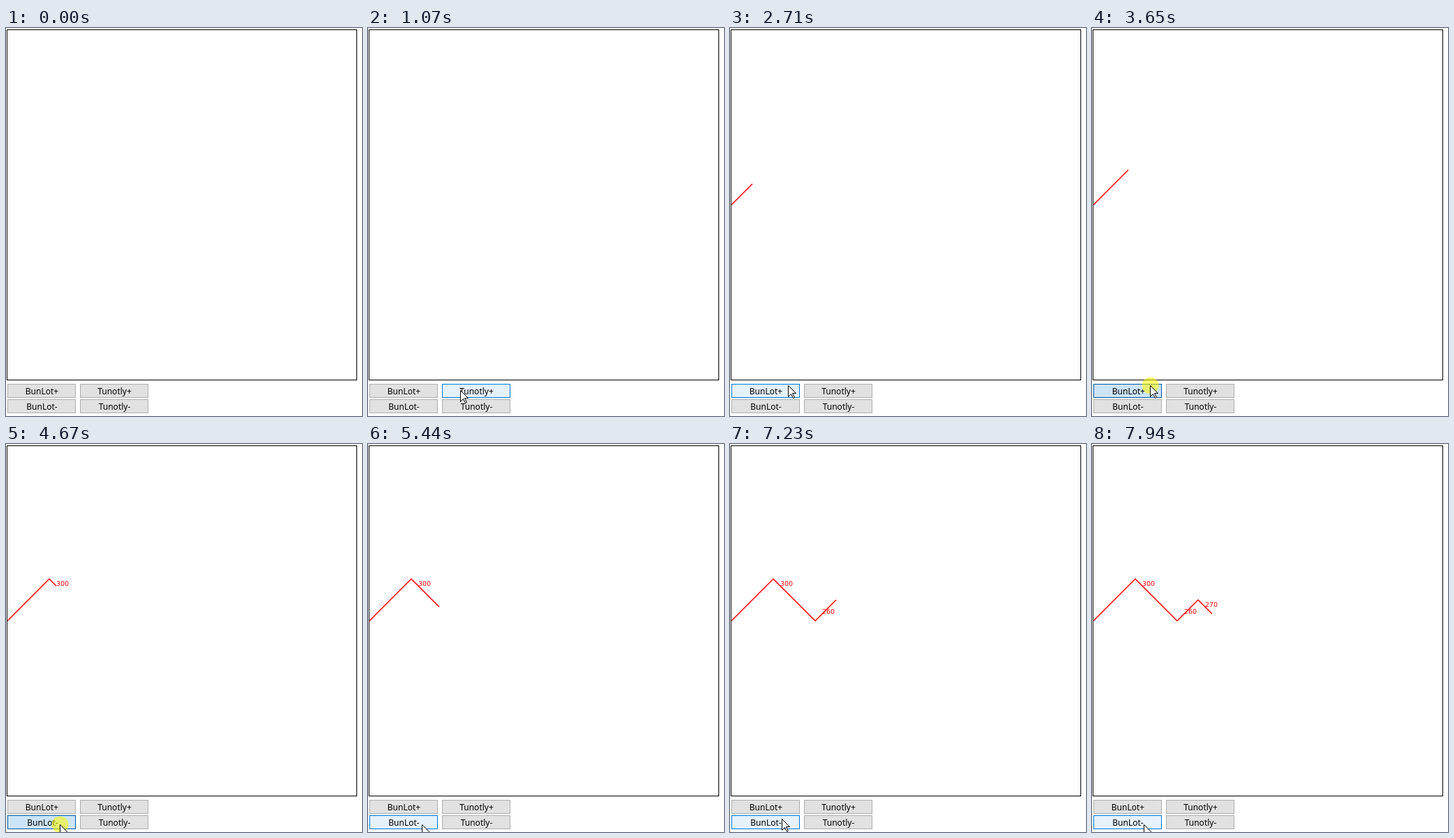
Recreate the animation shown at these times as an HTML page with a canvas. Size 510 by 555 pixels, loop 8 s.

```html
<!DOCTYPE html>
<html lang="en">
<head>
<meta charset="utf-8">
<title>Price chart</title>
<style>
  html, body { margin: 0; width: 100%; height: 100%; overflow: hidden; background: #fff; }
  canvas { display: block; }
</style>
</head>
<body>
<canvas id="stage" width="510" height="555"></canvas>
<script>
const ctx = document.getElementById('stage').getContext('2d');
const LOOP = 8000;
const ORIGIN = { x: 2, y: 503 };   // bottom left of the plot
const START = 250, STEP = 10;
const HOLD = 75;                   // how long a click lasts
const TICK = 75;                   // pointer refresh while it travels
const W = 98, H = 20;

const buttons = ['BunLot', 'Tunotly'].flatMap((name, col) =>
  ['+', '-'].map((sign, row) => ({
    label: name + sign, x: 2 + col * 104, y: 509 + row * 22
  })));

const skins = {
  idle: ['#e1e1e1', '#adadad'],
  hover: ['#e5f1fb', '#0078d7'],
  down: ['#cce4f7', '#005499']
};

// The pointer travels to a spot, then clicks there several times.
const entry = { at: 550, x: 339, y: 548 };
const bursts = [
  { x: 83, y: 511, travel: 750, first: 1765, last: 3650, count: 6, ease: 0.87, dir: 1 },
  { x: 77, y: 544, travel: 150, first: 4280, last: 5990, count: 6, ease: 0.94, dir: -1 },
  { x: 74, y: 517, travel: 300, first: 6465, last: 7070, count: 3, ease: 1, dir: 1 },
  { x: 74, y: 544, travel: 150, first: 7530, last: 7850, count: 2, ease: 1, dir: -1 }
];

const clicks = bursts.flatMap(b => Array.from({ length: b.count }, (_, i) => {
  const press = b.first + (b.last - b.first) * (i / (b.count - 1)) ** b.ease;
  return { press, release: press + HOLD, dir: b.dir };
}));

function pointerAt(t) {
  if (t < entry.at) return null;
  let { at, x, y } = entry;
  for (const b of bursts) {
    if (t < at) break;
    const gone = Math.floor((t - at) / TICK) * TICK;
    const e = Math.sin(Math.min(1, gone / b.travel) * Math.PI / 2);
    x = Math.round(x + (b.x - x) * e);
    y = Math.round(y + (b.y - y) * e);
    at = b.last + HOLD;
  }
  return { x, y };
}

function drawPlot(t) {
  ctx.strokeStyle = '#000';
  ctx.lineWidth = 1;
  ctx.strokeRect(1.5, 2.5, 501, 501);

  ctx.save();
  ctx.beginPath();
  ctx.rect(2, 3, 500, 500);
  ctx.clip();
  ctx.strokeStyle = ctx.fillStyle = '#f00';
  ctx.lineWidth = 1.5;
  ctx.font = '9.5px "DejaVu Sans", sans-serif';
  ctx.textAlign = 'left';

  let x = ORIGIN.x, value = START, lastDir = 1;
  ctx.beginPath();
  ctx.moveTo(x, ORIGIN.y - value);
  for (const c of clicks) {
    if (t < c.release) break;
    x += STEP;
    value += c.dir * STEP;
    ctx.lineTo(x, ORIGIN.y - value);
    if (c.dir !== lastDir) ctx.fillText(value, x, ORIGIN.y - value);
    lastDir = c.dir;
  }
  ctx.stroke();
  ctx.restore();
}

function drawButton(b, state) {
  const [fill, edge] = skins[state];
  ctx.fillStyle = fill;
  ctx.fillRect(b.x, b.y, W, H);
  ctx.strokeStyle = edge;
  ctx.lineWidth = 1;
  ctx.strokeRect(b.x + 0.5, b.y + 0.5, W - 1, H - 1);
  ctx.fillStyle = '#000';
  ctx.font = '12px "Noto Sans", "Open Sans", sans-serif';
  ctx.textAlign = 'center';
  ctx.fillText(b.label, b.x + W / 2 + (state === 'down' ? 1.5 : 0.5), b.y + 15);
}

function drawGlow(p) {
  ctx.fillStyle = 'rgba(250, 250, 0, 0.56)';
  ctx.beginPath();
  ctx.arc(p.x + 0.5, p.y + 0.5, 12, 0, Math.PI * 2);
  ctx.fill();
}

function drawPointer(p) {
  const outline = [[0, 0], [0, 16], [4, 12], [7, 18], [9, 17], [6, 11], [11, 11]];
  ctx.beginPath();
  for (const [x, y] of outline) ctx.lineTo(p.x + x + 0.5, p.y + y + 0.5);
  ctx.closePath();
  ctx.fillStyle = '#fff';
  ctx.fill();
  ctx.strokeStyle = '#000';
  ctx.lineWidth = 1;
  ctx.lineJoin = 'round';
  ctx.stroke();
  ctx.lineJoin = 'miter';
}

function draw(t) {
  ctx.fillStyle = '#fff';
  ctx.fillRect(0, 0, 510, 555);
  drawPlot(t);

  const p = pointerAt(t);
  const pressed = clicks.some(c => t >= c.press && t < c.release);
  for (const b of buttons) {
    const over = p && p.x >= b.x && p.x < b.x + W && p.y >= b.y && p.y < b.y + H;
    drawButton(b, !over ? 'idle' : pressed ? 'down' : 'hover');
  }
  if (pressed) drawGlow(p);
  if (p) drawPointer(p);
}

const begin = performance.now();
function loop() {
  draw((performance.now() - begin) % LOOP);
  requestAnimationFrame(loop);
}
loop();
</script>
</body>
</html>
```
